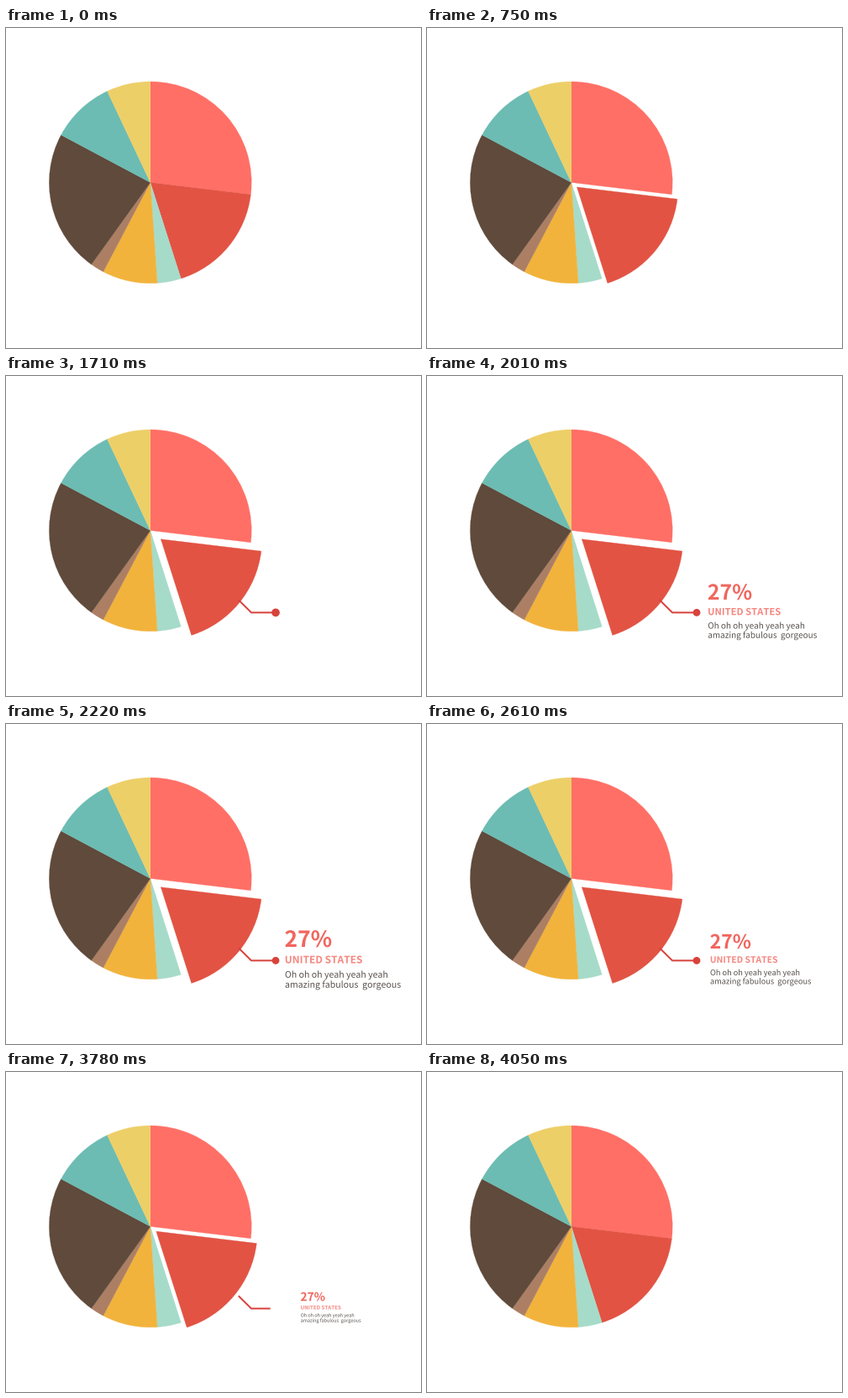
A matplotlib script that plays this animation: 494x382 px, repeating every 4.89 s.

```python
import math
import matplotlib.pyplot as plt
from matplotlib.animation import FuncAnimation
from matplotlib.patches import Circle, PathPatch, Wedge
from matplotlib.textpath import TextPath
from matplotlib.transforms import Affine2D

W, H, DPI = 494, 382, 100
STEP, LOOP = 30, 4890
CX, CY, R = 171.8, 184.4, 120.4
PX = 72 / DPI  # points per pixel

RED, LINE = "#e25343", "#d8423b"
SLICES = [  # end of slice in percent, colour
    (26.9, "#ff6f66"), (45.1, RED), (48.9, "#a6dbc9"), (57.7, "#f2b33c"),
    (59.9, "#ac7f64"), (82.8, "#5f4a3b"), (93.0, "#6cbcb3"), (100, "#edcf68"),
]
OUT = 16.2
MID = math.radians(3.6 * 36)
ELBOW = [(277.5, 268), (292, 282.4), (321, 282.4)]
TEXT_MID = (371, 281)
FONT = "Noto Sans CJK JP"
LABELS = [  # text, x, baseline, size, weight, colour
    ("27%", 336.6, 268, 23, "bold", "#f0665e"),
    ("UNITED STATES", 336.8, 285, 10.4, "bold", "#f58780"),
    ("Oh oh oh yeah yeah yeah", 337, 300, 9.2, "normal", "#57514d"),
    ("amazing fabulous  gorgeous", 337, 310.4, 9.2, "normal", "#57514d"),
]


def span(t, start, length):
    return min(1, max(0, (t - start) / length))


def ease_in_out(p):
    return 4 * p ** 3 if p < 0.5 else 1 - 4 * (1 - p) ** 3


def ease_out(p):
    return 1 - (1 - p) ** 3


def back_out(p, c):
    q = p - 1
    return 1 + (c + 1) * q ** 3 + c * q * q


def back_in(p, c):
    return (c + 1) * p ** 3 - c * p * p


def polar(angle, r):
    return CX + r * math.sin(angle), CY - r * math.cos(angle)


def trim(points, part):
    """First part (0..1) of a polyline."""
    left = part * sum(math.dist(a, b) for a, b in zip(points, points[1:]))
    path = [points[0]]
    for a, b in zip(points, points[1:]):
        d = math.dist(a, b)
        k = min(1, left / d)
        path.append((a[0] + k * (b[0] - a[0]), a[1] + k * (b[1] - a[1])))
        left -= d
        if left <= 0:
            break
    return path


fig = plt.figure(figsize=(W / DPI, H / DPI), dpi=DPI, facecolor="white")
ax = fig.add_axes([0, 0, 1, 1])
ax.set_xlim(0, W)
ax.set_ylim(H, 0)
ax.axis("off")

begin = 0
wedges = []
for end, color in SLICES:
    wedge = Wedge((CX, CY), R, 3.6 * begin - 90, 3.6 * end - 90,
                  facecolor=color, edgecolor=color, linewidth=0.2)
    wedges.append(ax.add_patch(wedge))
    begin = end
moving = wedges[1]

rays = [ax.plot([], [], color=RED, lw=1.6 * PX, solid_capstyle="butt")[0]
        for _ in range(7)]
leader, = ax.plot([], [], color=LINE, lw=2 * PX, solid_joinstyle="miter")
knob = ax.add_patch(Circle(ELBOW[-1], 4.4, facecolor=LINE, linewidth=0))

texts = []
for label, x, y, size, weight, color in LABELS:
    path = TextPath((0, 0), label, size=size,
                    prop={"family": FONT, "weight": weight})
    patch = ax.add_patch(PathPatch(path, facecolor=color, linewidth=0))
    texts.append((patch, x, y))


def draw(i):
    t = i * STEP

    shift = OUT * (ease_in_out(span(t, 240, 1000))
                   - ease_in_out(span(t, 3540, 500)))
    moving.set_center((CX + shift * math.sin(MID), CY - shift * math.cos(MID)))

    p = span(t, 750, 360)
    head = 140 + 26 * ease_out(p)
    tail = 140 + 26 * p ** 0.8
    for k, ray in enumerate(rays):
        a = math.radians(128.3 + 10 * (k - 3))
        ray.set_data(*zip(polar(a, tail), polar(a, max(head, tail + 1.6))))
        ray.set_visible(0 < p < 1)

    part = ease_in_out(span(t, 1290, 390)) - ease_in_out(span(t, 3690, 270))
    leader.set_data(*zip(*trim(ELBOW, part)))
    leader.set_visible(part > 0)
    dot = back_out(span(t, 1590, 210), 1.7) - ease_in_out(span(t, 3600, 180))
    knob.set_radius(4.4 * max(0, dot))
    knob.set_visible(dot > 0)

    s = back_out(span(t, 1765, 700), 2.4) - back_in(span(t, 3470, 380), 1.15)
    for patch, x, y in texts:
        move = (Affine2D().scale(1, -1).translate(x, y)
                .translate(-TEXT_MID[0], -TEXT_MID[1])
                .scale(max(s, 0.001)).translate(*TEXT_MID))
        patch.set_transform(move + ax.transData)
        patch.set_visible(s > 0.01)
    return []


anim = FuncAnimation(fig, draw, frames=LOOP // STEP, interval=STEP,
                     repeat=True, repeat_delay=0, blit=False)
plt.show()
```
